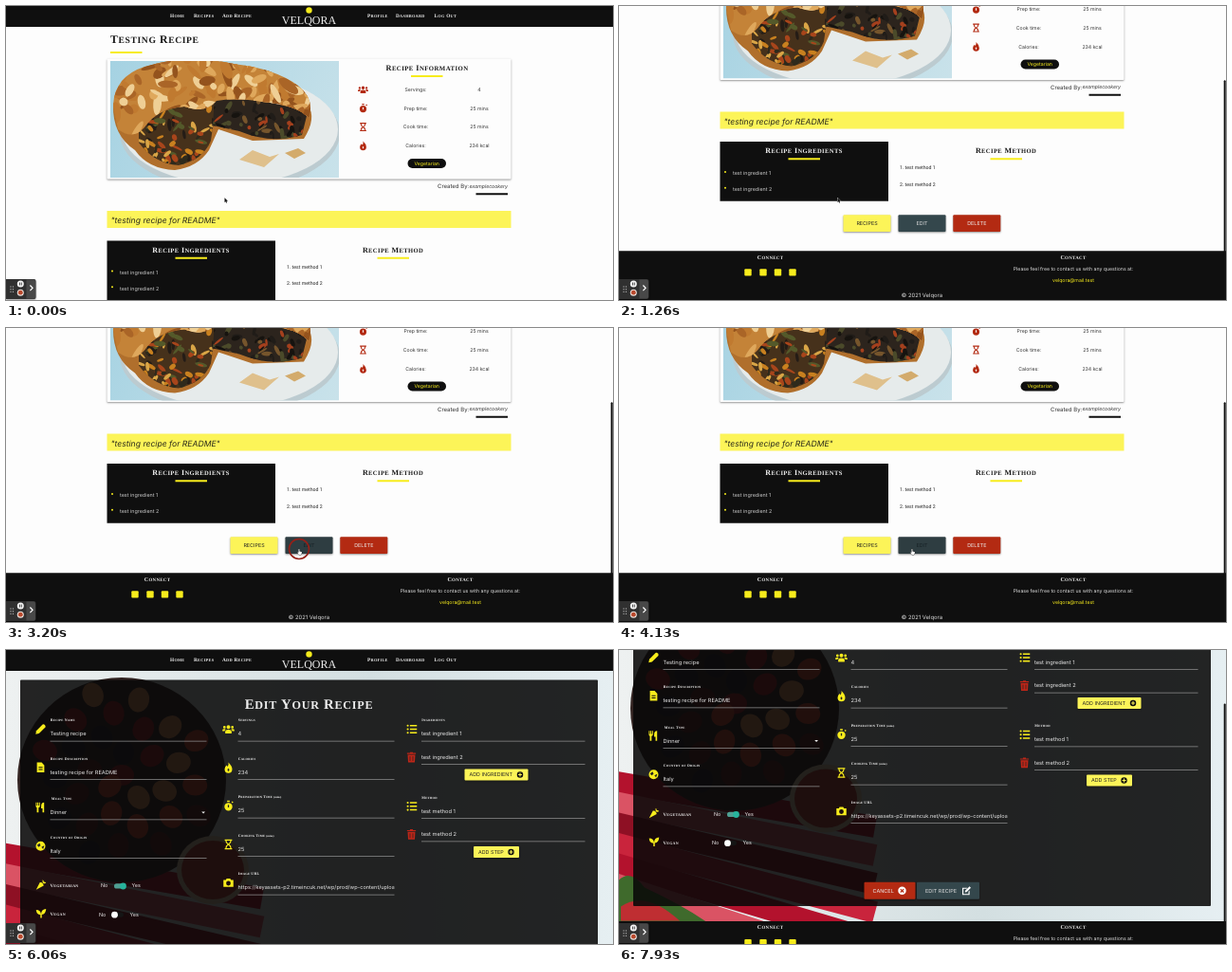
Recreate the animation shown at these times as an HTML page with a canvas. Size 640x310 px, loop 8000 ms.

```html
<!DOCTYPE html>
<html lang="en">
<head>
<meta charset="utf-8">
<title>Editing a recipe</title>
<style>
html, body { margin: 0; width: 100%; height: 100%; overflow: hidden; background: #fdfdfd; }
canvas { display: block; width: 640px; height: 310px; }
</style>
</head>
<body>
<canvas id="stage"></canvas>
<script>
const W = 640, H = 310, LOOP = 8000;
const YELLOW = '#f7ec1c', PALE = '#fcf458', RED = '#b32a12', SLATE = '#34474c', INK = '#0f0f0f';
const SANS = 'Inter, "Open Sans", sans-serif', SERIF = '"Liberation Serif", serif';
const canvas = document.getElementById('stage'), ctx = canvas.getContext('2d');
const dpr = window.devicePixelRatio || 1;
canvas.width = W * dpr;
canvas.height = H * dpr;
ctx.textRendering = 'geometricPrecision';

const clamp = v => Math.max(0, Math.min(1, v));
const progress = (t, from, to) => clamp((t - from) / (to - from));
const ease = p => p * p * (3 - 2 * p);
const mix = (a, b, p) => a + (b - a) * p;
const noise = n => { const v = Math.sin(n * 12.9898) * 43758.5453; return v - Math.floor(v); };

// Icons are drawn around the origin, about ten units wide.
const dot = (x, y, r) => `M${x - r} ${y}a${r} ${r} 0 1 0 ${2 * r} 0a${r} ${r} 0 1 0 ${-2 * r} 0Z`;
const listRow = y => dot(-4.2, y, 1) + `M-2 ${y - .7}H5V${y + .7}H-2Z`;
const ICONS = {
  users: dot(0, -2.2, 1.9) + dot(-4, -2, 1.3) + dot(4, -2, 1.3) +
    'M-3.2 4.2V2.6Q-3.2 .4 0 .4T3.2 2.6V4.2ZM-6 2V1Q-6 -.2 -4 -.2T-3 .4Q-3.8 1 -3.8 2ZM6 2V1Q6 -.2 4 -.2T3 .4Q3.8 1 3.8 2Z',
  timer: dot(0, .8, 4) + 'M-1.3 -5.5h2.6v1.4h-2.6ZM3 -3.8l1 -1 1 1 -1 1ZM-.6 -1.2h1.2v2.6h-1.2Z',
  hourglass: 'M-3.7 -5H3.7V-3.7H3Q3 -1.2 .9 0 3 1.2 3 3.7H3.7V5H-3.7V3.7H-3Q-3 1.2 -.9 0 -3 -1.2 -3 -3.7H-3.7Z' +
    'M-1.9 -3.7H1.9Q1.8 -1.6 0 -.6 -1.8 -1.6 -1.9 -3.7ZM-1.9 3.7H1.9Q1.8 1.6 0 .6 -1.8 1.6 -1.9 3.7Z',
  flame: 'M0 -5.2Q3.8 -1.5 3.8 1.6A3.8 3.8 0 0 1 -3.8 1.6Q-3.8 -.6 -1.8 -2.4L-.9 -1Q.6 -2.6 0 -5.2ZM0 .6Q1.8 2 0 3.8 -1.8 2 0 .6Z',
  pencil: 'M-5 5L-4.3 1.6 2 -4.7Q3 -5.6 4.2 -4.4T4.7 -2L-1.6 4.3Z',
  file: 'M-3.7 -5H1L3.7 -2.3V5H-3.7ZM-2 -.5H2V.4H-2ZM-2 1.6H2V2.5H-2Z',
  cutlery: 'M-4.3 -5h.9v3h.7v-3h.9v3h.7v-3h.9V-1.5Q-.2 -.2 -1.6 .2V5h-1.7V.2Q-4.3 -.2 -4.3 -1.5ZM1 -1Q1 -5 4 -5V5H2.4V1H1Z',
  globe: dot(0, 0, 4.8) + 'M-3.6 -1L-1 -3 0 -.5 -2 1ZM.8 1L3.6 -.5 2.5 3Z',
  carrot: 'M-5 5L-1.2 -2.4Q2 -3 2.6 1ZM1.5 -2.5V-5Q3 -4 2.6 -2.8 4 -3.4 5 -1.8 4 -.8 2.5 -1.2Z',
  sprout: 'M-5 -3.5Q-.3 -3.4 0 1 .2 -4.2 5 -4.5 4.8 .8 .7 1.2V4.6H-.7V1.4Q-4.8 1 -5 -3.5Z',
  camera: 'M-5 -2.8H-2.6L-1.8 -4.2H1.8L2.6 -2.8H5V4H-5Z' + dot(0, .5, 2.3),
  list: listRow(-3.6) + listRow(0) + listRow(3.6),
  trash: 'M-4.4 -4.4H-1.5V-5.2H1.5V-4.4H4.4V-3.3H-4.4ZM-3.8 -2.6H3.8L3.3 5H-3.3ZM-1.8 -1.2h.7v4.8h-.7ZM1.1 -1.2h.7v4.8h-.7Z',
  plus: dot(0, 0, 5) + 'M-.8 -3H.8V-.8H3V.8H.8V3H-.8V.8H-3V-.8H-.8Z',
  cross: dot(0, 0, 5) + 'M-2.5 -1.5L-1.5 -2.5 0 -1 1.5 -2.5 2.5 -1.5 1 0 2.5 1.5 1.5 2.5 0 1 -1.5 2.5 -2.5 1.5 -1 0Z',
  edit: 'M-5 -3.5H1L-.2 -2.2H-3.7V3.7H2.2V1L3.5 -.3V5H-5ZM-2 2L-1.6 0 3.4 -5 5 -3.4 0 1.6Z',
  arrow: 'M0 0V6.4L1.5 5.1 2.5 7.2 3.5 6.7 2.5 4.7H4.6Z',
  hand: 'M-.7 -1Q0 -1.8 .6 -1V2L3.4 2.6Q4.2 3 3.9 4L3 6.6H-.4L-2.4 3.8Q-2 2.8 -.7 3.6Z'
};
for (const name in ICONS) ICONS[name] = new Path2D(ICONS[name]);

function icon(name, x, y, color, scale = 1, outline) {
  ctx.save();
  ctx.translate(x, y);
  ctx.scale(scale, scale);
  if (outline) {
    ctx.strokeStyle = outline;
    ctx.lineWidth = 1;
    ctx.stroke(ICONS[name]);
  }
  ctx.fillStyle = color;
  ctx.fill(ICONS[name], 'evenodd');
  ctx.restore();
}

function box(x, y, w, h, color, radius = 0) {
  ctx.fillStyle = color;
  ctx.beginPath();
  ctx.roundRect(x, y, w, h, radius);
  ctx.fill();
}

function raised(...args) {
  ctx.save();
  ctx.shadowColor = 'rgba(0,0,0,.4)';
  ctx.shadowBlur = 2 * dpr;
  ctx.shadowOffsetY = dpr;
  box(...args);
  ctx.restore();
}

function ellipse(x, y, rx, ry, color, angle = 0) {
  ctx.fillStyle = color;
  ctx.beginPath();
  ctx.ellipse(x, y, rx, ry, angle, 0, 7);
  ctx.fill();
}

function shape(path, color) {
  ctx.fillStyle = color;
  ctx.fill(new Path2D(path));
}

function text(str, x, y, size, color, align = 'left', style = '', family = SANS) {
  ctx.font = `${style} ${size}px ${family}`;
  ctx.textAlign = align;
  ctx.fillStyle = color;
  ctx.fillText(str, x, y + size * .35);
}

// Serif heading: full capitals followed by slightly smaller ones. Returns its right edge.
function heading(str, x, y, size, color, align = 'left') {
  ctx.letterSpacing = `${size * .05}px`;
  const runs = str.match(/[A-Z ]+|[^A-Z ]+/g).map(run => {
    const font = `bold ${/[A-Z ]/.test(run) ? size : size * .82}px ${SERIF}`;
    ctx.font = font;
    return { font, str: run.toUpperCase(), width: ctx.measureText(run.toUpperCase()).width };
  });
  if (align === 'center') x -= runs.reduce((sum, run) => sum + run.width, 0) / 2;
  ctx.textAlign = 'left';
  ctx.fillStyle = color;
  for (const run of runs) {
    ctx.font = run.font;
    ctx.fillText(run.str, x, y + size * .33);
    x += run.width;
  }
  ctx.letterSpacing = '0px';
  return x;
}

function header() {
  box(0, 0, W, 22, INK);
  [['Home', 173], ['Recipes', 198], ['Add Recipe', 228], ['Profile', 381], ['Dashboard', 411], ['Log Out', 451.5]]
    .forEach(([label, x]) => heading(label, x, 10.5, 5.3, '#f0f0f0'));
  ellipse(319.5, 4.5, 3.2, 3.2, YELLOW);
  text('VELQORA', 319.5, 14.5, 12, '#eee', 'center', '', SERIF);
}

function footer(top) {
  box(0, top, W, 60, INK);
  heading('Connect', 159.5, top + 6.5, 6, '#eee', 'center');
  heading('Contact', 479, top + 6.5, 6, '#eee', 'center');
  for (const x of [136, 152, 167.5, 183]) box(x - 3.7, top + 19, 7.4, 7.4, YELLOW, 1);
  text('Please feel free to contact us with any questions at:', 479, top + 18.5, 5.2, '#ddd', 'center');
  text('velqora@mail.test', 479, top + 31, 5.2, YELLOW, 'center');
  text('© 2021 Velqora', 319.5, top + 46.5, 5.9, '#ddd', 'center');
}

// Scatters seeded blobs over a clipped outline.
function scatter(outline, [x, y, w, h], count, colors, size, seed) {
  ctx.save();
  ctx.clip(new Path2D(outline));
  for (let i = 0; i < count; i++) {
    const n = seed + i;
    ellipse(x + noise(n) * w, y + noise(n + 300) * h, size * (.4 + noise(n + 600)), size * (.2 + noise(n + 900) * .4),
      colors[i % colors.length], noise(n + 50) * 3);
  }
  ctx.restore();
}

function piePhoto() {
  const top = 'M3 46Q5 16 36 6 80 -8 130 3 174 8 198 26 216 40 209 60 196 46 160 43 132 38 112 42 100 56 78 48 50 50 36 70 24 84 8 72Z';
  const leftCut = 'M30 72Q46 46 80 46L112 42 106 84Q98 104 72 110 46 108 30 86Z';
  const rightCut = 'M110 40Q150 36 208 54L202 78Q170 88 136 74L108 68Z';
  ctx.save();
  ctx.translate(110, 58);
  ctx.beginPath();
  ctx.rect(0, 0, 241, 123);
  ctx.clip();
  const sky = ctx.createLinearGradient(0, 0, 241, 123);
  sky.addColorStop(0, '#a5d2e2');
  sky.addColorStop(1, '#c9e2ea');
  box(0, 0, 241, 123, sky);
  ellipse(126, 76, 116, 60, '#bccbd0');
  ellipse(126, 72, 114, 58, '#e6ebeb');
  shape('M3 46Q2 78 26 94 40 114 68 115 92 112 104 94L114 72 150 84 204 82Q218 60 208 46Z', '#b06f2c');
  shape(leftCut, '#46311b');
  scatter(leftCut, [30, 44, 80, 66], 80, ['#c8801f', '#54592a', '#241c16', '#d9a546', '#a8451b', '#2e2a1c'], 5, 10);
  shape(rightCut, '#2c241d');
  scatter(rightCut, [106, 38, 104, 48], 80, ['#201c18', '#4b4a2a', '#a5401d', '#16130f', '#76552c'], 4.5, 120);
  shape(top, '#c48338');
  scatter(top, [0, -2, 214, 84], 170, ['#dfa85c', '#94531d', '#c07a30', '#efcf95', '#aa6527'], 9, 400);
  shape('M136 104L150 94 168 101 178 98 162 112Z', '#dfc08c');
  shape('M184 97L198 92 206 97 194 103Z', '#d3ab6c');
  ctx.restore();
}

function titleBar(x, y, color = YELLOW) { box(x, y, 33.5, 2, color); }

function recipePage(scroll, hover) {
  ctx.save();
  ctx.translate(0, -scroll);
  header();
  heading('Testing Recipe', 110, 35, 11.8, '#1a1a1a');
  titleBar(110, 48);

  raised(106.5, 55.5, 426, 127, '#fdfdfd', 1);
  piePhoto();
  heading('Recipe Information', 444, 65.5, 8.3, '#1a1a1a', 'center');
  titleBar(427, 73);
  [['users', 'Servings:', '4'], ['timer', 'Prep time:', '25 mins'], ['hourglass', 'Cook time:', '25 mins'], ['flame', 'Calories:', '234 kcal']]
    .forEach(([name, label, value], i) => {
      const y = 88.2 + i * 19.7;
      icon(name, 376.5, y, RED, .9);
      text(label, 432, y, 5.2, '#333', 'center');
      text(value, 499, y, 5.2, '#333', 'center');
    });
  box(423.5, 161, 40.5, 10, INK, 5);
  text('Vegetarian', 443.7, 166, 5.2, YELLOW, 'center');

  text('Created By: ', 455, 190, 6, '#333');
  text('examplecookery', 529, 190, 5.2, '#333', 'right', 'italic');
  titleBar(495.5, 197.3, INK);
  box(106.5, 216, 426, 18, PALE);
  text('"testing recipe for README"', 110.5, 226, 8.6, '#2a2a1a', 'left', 'italic');

  box(106.5, 247.5, 177.5, 62.8, INK);
  heading('Recipe Ingredients', 195, 257, 8, '#eee', 'center');
  titleBar(178.5, 264.7);
  heading('Recipe Method', 408, 257, 8, '#1a1a1a', 'center');
  titleBar(391.5, 264.7);
  for (const i of [1, 2]) {
    const y = 264.5 + i * 16.6;
    ellipse(112, y - 1.5, 1, 1, YELLOW);
    text('test ingredient ' + i, 120, y, 5.4, '#ccc');
    text(`${i}. test method ${i}`, 296, 257.7 + i * 17.4, 5.2, '#222', 'left', '', 'Roboto, sans-serif');
  }

  [['RECIPES', 236.5, PALE, '#222'], ['EDIT', 294.5, hover ? '#2e3d41' : SLATE, hover ? '#172125' : '#ddd'], ['DELETE', 352.3, RED, '#eee']]
    .forEach(([label, x, fill, color]) => {
      raised(x, 324.7, 50, 17.8, fill, 1);
      text(label, x + 25, 333.7, 5.4, color, 'center');
    });
  footer(362.7);
  ctx.restore();
}

function fruitBackdrop() {
  ctx.save();
  ctx.beginPath();
  ctx.rect(0, 22, W, 339.5);
  ctx.clip();
  const marble = ctx.createLinearGradient(0, 0, W, 0);
  marble.addColorStop(0, '#eef1f1');
  marble.addColorStop(.6, '#d3dfe1');
  marble.addColorStop(1, '#e6eff2');
  box(0, 22, W, 340, marble);
  ctx.lineWidth = 23;
  for (let i = 0; i < 7; i++) {
    ctx.strokeStyle = ['#b3122d', '#da5364', '#8e1024', '#c9243c'][i % 4];
    ctx.beginPath();
    ctx.moveTo(-20, 212 + i * 21);
    ctx.lineTo(270, 262 + i * 30);
    ctx.stroke();
  }
  ellipse(122, 137, 110, 108, '#332422');
  const fruit = ['#a31525', '#d6432c', '#1f1c2b', '#e08a54', '#59151c'];
  for (let i = 0; i < 30; i++) {
    const a = i * 2.4, r = 17 * Math.sqrt(i);
    ellipse(122 + Math.cos(a) * r, 132 + Math.sin(a) * r, 13, 11, fruit[i % 5], a);
  }
  ellipse(218, 232, 38, 36, '#e7cfae');
  ellipse(218, 232, 33, 31, '#bd3c35');
  shape('M0 318Q12 306 27 326 66 344 92 362H0Z', '#3f6a2c');
  shape('M2 346Q28 328 64 361H2Z', '#bf2e32');
  ctx.restore();
}

function toggle(x, y, on) {
  text('No', x, y, 5.4, '#eee');
  box(x + 14, y - 2.2, 12, 5.2, on ? '#4f9f92' : '#151515', 2.6);
  ellipse(x + (on ? 23.5 : 16.5), y + .5, 3.4, 3.4, on ? '#27b39c' : '#fff');
  text('Yes', x + 32.5, y, 5.4, '#eee');
}

function editPage(scroll, t) {
  const ready = t >= 5060, settle = ease(progress(t, 5060, 5260));
  const extra = ready ? 18 : 0;
  const shade = (r, g, b) => `rgb(${mix(10, r, settle)},${mix(10, g, settle)},${mix(10, b, settle)})`;
  const bright = shade(247, 236, 28), danger = shade(190, 38, 24);
  const gray = mix(165, 245, settle), labelColor = `rgb(${gray},${gray},${gray})`;

  const label = (str, x, y, note) => {
    const size = mix(5, 3.9, settle), top = y + mix(9, 0, settle);
    const end = heading(str, x + mix(1.5, .3, settle), top, size, labelColor);
    if (note) text('(mins)', end + 1, top, size * .78, labelColor, 'left', 'bold', SERIF);
  };
  const line = (x, y, w) => box(x, y, w, .7, '#8d8d8d');
  const field = (x, y, w, name, title, value, note) => {
    icon(name, x - 10, y + 9.5, bright, 1.05);
    label(title, x, y, note);
    text(value, x, y + 14.5, 5.7, '#e9e9e9');
    line(x, y + 21.7, w);
  };
  const action = (str, x, y, w) => {
    raised(x, y, w, 12, PALE, 1);
    text(str, x + 5, y + 6, 5.4, '#222');
    icon('plus', x + w - 8.5, y + 6, '#111', .65);
  };

  ctx.save();
  ctx.translate(0, -scroll);
  if (t >= 5400) fruitBackdrop();
  header();
  box(15, 31.5, 609, 296 + extra, 'rgba(8,8,8,.88)', 1);
  heading('Edit Your Recipe', 319.5, 57, 14.8, '#eee', 'center');

  field(46.5, 74, 165, 'pencil', 'Recipe Name', 'Testing recipe');
  field(46.5, 114.3, 165, 'file', 'Recipe Description', 'testing recipe for README');
  icon('cutlery', 36, 166, bright, 1.05);
  label('Meal Type', 47.5, 157);
  if (ready) {
    text('Dinner', 46.5, 171.2, 5.7, '#e9e9e9');
    line(46.5, 178.5, 165);
    shape('M206.2 170.5h3.8l-1.9 2z', '#eee');
  }
  field(46.5, 179.3 + extra, 165, 'globe', 'Country of Origin', 'Italy');
  [['carrot', 'Vegetarian', 230.5, 100], ['sprout', 'Vegan', 260.7, 98]].forEach(([name, title, y, x], i) => {
    icon(name, 37, y + extra - 1, bright, 1.05);
    heading(title, 46.5, y + extra, 4.9, '#f0f0f0');
    toggle(x, y + extra, i === 0);
  });

  [['users', 'Servings', '4'], ['flame', 'Calories', '234'], ['timer', 'Preparation Time', '25', true],
   ['hourglass', 'Cooking Time', '25', true], ['camera', 'Image URL', '']]
    .forEach(([name, title, value, note], i) => field(244.5, 74 + i * 40.5, 165, name, title, value, note));
  ctx.save();
  ctx.beginPath();
  ctx.rect(244, 240, 165.5, 20);
  ctx.clip();
  text('https://keyassets-p2.timeincuk.net/wp/prod/wp-content/uploads', 244.5, 250.5, 5.6, '#e9e9e9');
  ctx.restore();

  [['Ingredients', 'ingredient', 74], ['Method', 'method', 155.3]].forEach(([title, item, y]) => {
    field(438, y, 172.5, 'list', title, `test ${item} 1`);
    icon('trash', 427.5, y + 39.2, danger, 1.05);
    text(`test ${item} 2`, 438, y + 39, 5.7, '#e9e9e9');
    line(438, y + 46.3, 172.5);
  });
  action('ADD INGREDIENT', 483.5, 125.5, 67);
  action('ADD STEP', 493, 207, 48);

  raised(258.5, 302.3 + extra, 54, 18, RED, 1);
  text('CANCEL', 267.5, 311.3 + extra, 5.5, '#eee');
  icon('cross', 298.5, 311.3 + extra, '#fff', .85);
  raised(314, 302.3 + extra, 66, 18, SLATE, 1);
  text('EDIT RECIPE', 323, 311.3 + extra, 5.5, '#ddd');
  icon('edit', 366.5, 311.3 + extra, '#fff', .9);
  footer(343.5 + extra);
  ctx.restore();
}

function recorder() {
  raised(0, 288, 31.5, 21, '#303030', [0, 2, 2, 0]);
  box(21.5, 288.5, 9.5, 20, '#484848', [0, 2, 2, 0]);
  for (let i = 0; i < 6; i++) ellipse(5 + (i % 2) * 2.5, 296 + (i >> 1) * 2.7, .7, .7, '#aaa');
  ellipse(15.3, 293, 3.5, 3.5, '#f4f4f4');
  box(13.9, 291.6, .9, 2.8, '#333');
  box(15.8, 291.6, .9, 2.8, '#333');
  ellipse(15.3, 302.2, 3.5, 3.5, '#eadfda');
  ellipse(15.3, 302.2, 2.4, 2.4, '#b9482c');
  ctx.strokeStyle = '#fff';
  ctx.lineWidth = 1.2;
  ctx.stroke(new Path2D('M25.4 294.5l2.7 2.8 -2.7 2.8'));
}

// Overlay scrollbar without a track.
function scrollbar(scroll, pageHeight) {
  box(637.7, scroll * H / pageHeight, 2, H * H / pageHeight, '#111', 1);
}

function pointer(t) {
  const p = ease(progress(t, 2200, 2900));
  const x = mix(230.5, 309, p), y = mix(202.3, 234, p);
  const ring = 1 - progress(t, 3330, 3660);
  if (t >= 3200 && ring > 0) {
    ctx.strokeStyle = `rgba(150,32,24,${ring})`;
    ctx.lineWidth = 1.6;
    ctx.beginPath();
    ctx.arc(309, 233, 10.5, 0, 7);
    ctx.stroke();
  }
  if (p > .85) icon('hand', x, y, '#fff', .75, '#111');
  else icon('arrow', x, y, '#111', .75, '#eee');
}

function draw(now) {
  const t = now % LOOP;
  ctx.setTransform(dpr, 0, 0, dpr, 0, 0);
  box(0, 0, W, H, '#fdfdfd');
  if (t < 4930) {
    const scroll = 104.5 * ease(progress(t, 500, 1200));
    recipePage(scroll, t >= 2760);
    if (scroll > 0) scrollbar(scroll, 414.5);
  } else {
    const scroll = 75.5 * ease(progress(t, 7200, 7930));
    editPage(scroll, t);
    if (t < 5600 || scroll > 0) scrollbar(scroll, t < 5060 ? 395.5 : 413.5);
  }
  if (t < 5600) pointer(t);
  recorder();
  requestAnimationFrame(draw);
}
requestAnimationFrame(draw);
</script>
</body>
</html>
```
